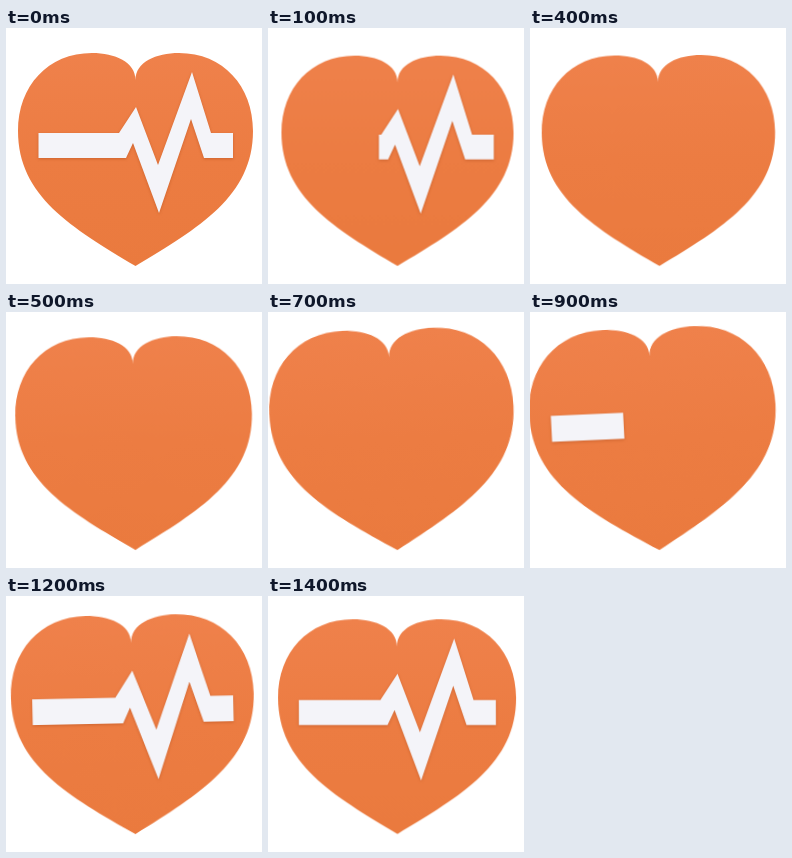
Write an HTML page without scripts that moves like this. It is 256 px wide and 256 px high and loops after 1500 ms.

```html
<!DOCTYPE html>
<html lang="en">
<head>
<meta charset="utf-8">
<title>Heartbeat</title>
<style>
  html, body { margin: 0; width: 100%; height: 100%; overflow: hidden; background: #fff; }
  svg { display: block; width: 100%; height: 100%; }

  /* The heart sways around its bottom tip */
  .heart { transform-origin: 129.5px 238px; animation: sway 1.5s infinite; }
  .pulse { filter: drop-shadow(0 1px 1.5px rgba(150, 55, 10, .35)); }
  .wipe { animation: wipe 1.5s infinite; }

  @keyframes sway {
    0%       { transform: matrix(1, 0, 0, 1, 0, 0); animation-timing-function: steps(2); }
    13.3333% { transform: matrix(.975, 0, 0, .975, 0, 0); animation-timing-function: steps(1); }
    20%      { transform: matrix(.979, 0, .002, .978, 0, 0); animation-timing-function: steps(2); }
    33.3333% { transform: matrix(1.007, -.012, .014, 1.001, 0, 0); animation-timing-function: steps(2); }
    46.6666% { transform: matrix(1.039, -.037, .045, 1.036, 0, 0); animation-timing-function: steps(2); }
    60%      { transform: matrix(1.048, -.046, .053, 1.042, 0, 0); animation-timing-function: steps(2); }
    73.3333% { transform: matrix(1.043, -.031, .034, 1.037, 0, 0); animation-timing-function: steps(3); }
    93.3333%, 100% { transform: matrix(1.013, 0, .003, 1.008, 0, 0); animation-timing-function: steps(1); }
  }

  /* The pulse leaves rightwards, then is drawn again from the left */
  @keyframes wipe {
    0%       { transform: translateX(32px); animation-timing-function: steps(3); }
    20%      { transform: translateX(268px); animation-timing-function: steps(1); }
    53.3333% { transform: translateX(-209px); animation-timing-function: steps(4); }
    80%, 100% { transform: translateX(9px); animation-timing-function: steps(1); }
  }
</style>
</head>
<body>
<svg viewBox="0 0 256 256">
  <defs>
    <linearGradient id="orange" x1="0" y1="0" x2="0" y2="1">
      <stop offset="0" stop-color="#ef814b"/>
      <stop offset=".5" stop-color="#ec7c42"/>
      <stop offset="1" stop-color="#ea7a3e"/>
    </linearGradient>
    <clipPath id="reveal"><rect class="wipe" width="256" height="256"/></clipPath>
  </defs>
  <g class="heart">
    <path fill="url(#orange)" d="M129.5 52C129.5 34 109 25 86 25C42 25 12 58 12 103C12 168 66 200 129.5 238C193 200 247 168 247 103C247 58 217 25 173 25C150 25 129.5 34 129.5 52Z"/>
    <g class="pulse">
      <path clip-path="url(#reveal)" fill="#f4f4f9" d="M32.5 105H113L130 79L152 137L186 44L205 105H227V130H198L185 91L153 185L127 115L120 130H32.5Z"/>
    </g>
  </g>
</svg>
</body>
</html>
```
